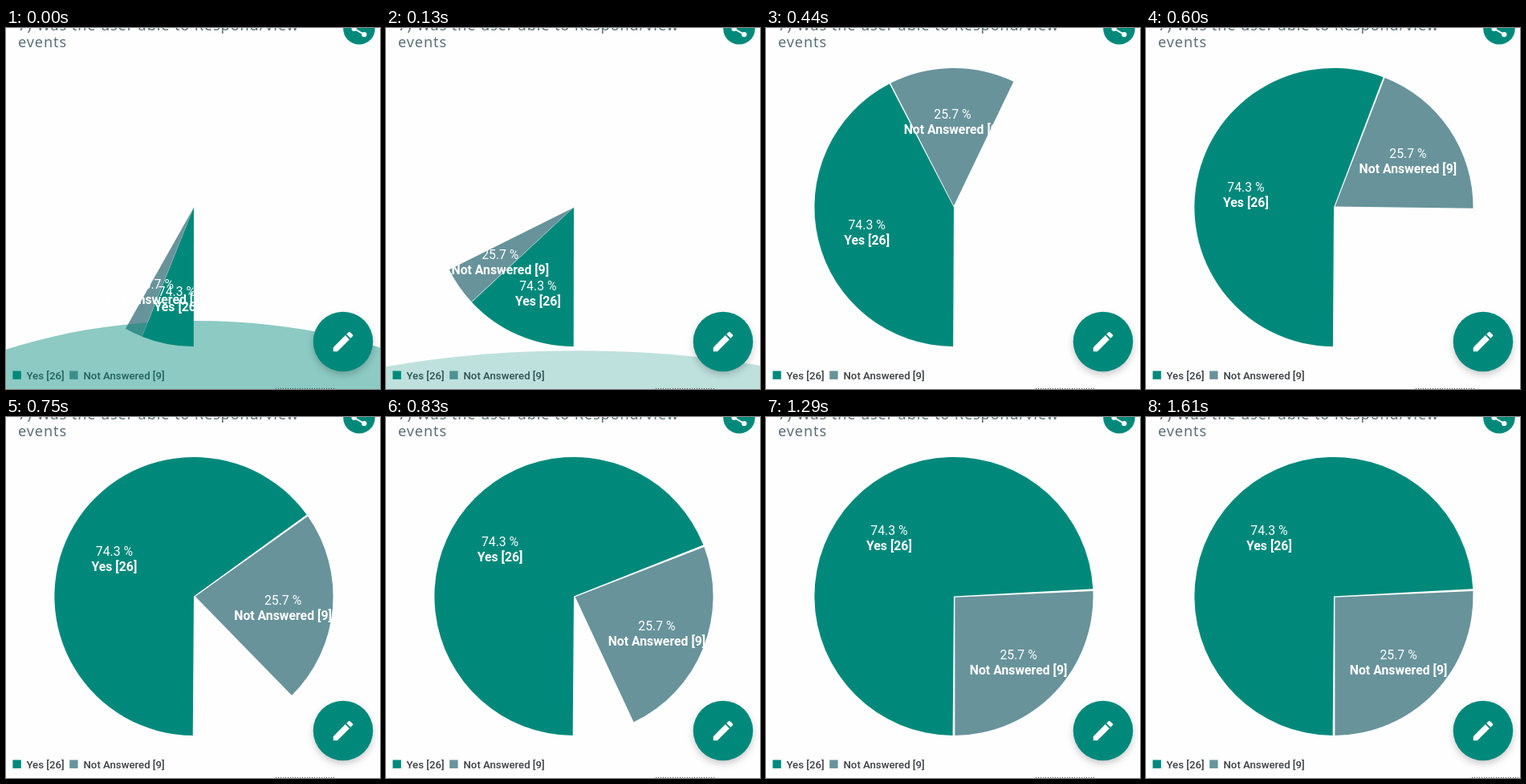
Write an HTML page that moves like this. It is 466 by 450 pixels and loops after 1.76 s.

```html
<!DOCTYPE html>
<html lang="en">
<head>
<meta charset="utf-8">
<title>Survey pie chart</title>
<style>
  html, body { margin: 0; width: 100%; height: 100%; overflow: hidden; background: #fefefe; }
  svg { display: block; width: 466px; height: 450px; }
  .title { font: 18.2px "Noto Sans", sans-serif; letter-spacing: .85px; fill: #5a7077; }
  .label { font: 15.8px Roboto, sans-serif; text-anchor: middle; fill: #fff; }
  .label .name { font-weight: bold; }
  .legend { font: 500 13.2px Roboto, sans-serif; fill: #3a3f42; }
  .green { fill: #00897b; }
  .slate { fill: #68939b; }
  .fab { filter: drop-shadow(0 4px 4px rgba(0, 0, 0, .2)); }
</style>
</head>
<body>
<svg viewBox="0 0 466 450">
  <text class="title" x="15" y="2.7">7) Was the user able to Respond/view</text>
  <text class="title" x="15" y="23.7">events</text>

  <path id="yesSlice" class="green"/>
  <path id="noneSlice" class="slate"/>
  <g id="yesLabel" class="label"><text>74.3 %</text><text class="name" y="19">Yes [26]</text></g>
  <g id="noneLabel" class="label"><text>25.7 %</text><text class="name" y="19">Not Answered [9]</text></g>

  <g class="legend">
    <rect class="green" x="8.4" y="427.5" width="10.4" height="10.4"/>
    <text x="25.5" y="437.7">Yes [26]</text>
    <rect class="slate" x="79.2" y="427.5" width="10.4" height="10.4"/>
    <text x="96.5" y="437.7">Not Answered [9]</text>
  </g>

  <ellipse id="glow" class="green" cx="237" rx="466"/>

  <g transform="translate(440 .8)">
    <circle class="green" r="19.8"/>
    <g fill="#fff" stroke="#fff" stroke-width="2">
      <path fill="none" d="M6.3 -7.3L-6.3 0L6.3 7.3"/>
      <circle cx="-6.3" r="2.2"/>
      <circle cx="6.3" cy="7.3" r="2.2"/>
    </g>
  </g>

  <circle class="green fab" cx="420" cy="391" r="37.3"/>
  <path fill="#fff" transform="translate(403.7 374.7) scale(1.36)"
    d="M3 17.25V21h3.75L17.81 9.94l-3.75-3.75zM20.71 7.04a1 1 0 0 0 0-1.41l-2.34-2.34a1 1 0 0 0-1.41 0l-1.83 1.83 3.75 3.75z"/>

  <path id="dots" stroke="#444" stroke-dasharray="1 2"/>
</svg>
<script>
const LOOP = 1760;
const CX = 234, CY = 223.5, RADIUS = 173.6, LABEL_RADIUS = 111.5;
const YES_ANGLE = 360 * 26 / 35;
const DEG = Math.PI / 180;
const GAP_ANGLE = 2.8 / RADIUS / DEG;

// The picture is held between these times.
const steps = [0, 70, 130, 210, 290, 360, 440, 520, 600, 680, 750, 830, 910, 980, 1060, 1130, 1610];
const progressKeys = [[0, .202], [130, .297], [440, .537], [750, .752], [980, .929], [1130, 1]];

const $ = id => document.getElementById(id);

function progressAt(t) {
  const next = progressKeys.findIndex(key => key[0] > t);
  if (next < 0) return 1;
  const [t0, p0] = progressKeys[next - 1], [t1, p1] = progressKeys[next];
  return p0 + (p1 - p0) * (t - t0) / (t1 - t0);
}

const easeInOut = p => p < .5 ? 2 * p * p : 1 - 2 * (1 - p) ** 2;

// Angles run clockwise in degrees from straight down.
function polar(angle, radius) {
  const a = angle * DEG;
  return [CX - radius * Math.sin(a), CY + radius * Math.cos(a)];
}

function drawSlice(name, from, to, phase) {
  const halfGap = GAP_ANGLE / 2;
  const start = (from + halfGap) * phase, end = (to - halfGap) * phase;
  const middle = (from + to) / 2 * phase;
  // Only slices up to a half circle have their tip moved out of the centre.
  const inset = to - from > 180 ? 0
    : RADIUS * Math.sin(halfGap * phase * DEG) / Math.sin((to - from) / 2 * phase * DEG);
  const large = end - start > 180 ? 1 : 0;
  $(name + "Slice").setAttribute("d", `M${polar(middle, inset)}L${polar(start, RADIUS)}` +
    `A${RADIUS} ${RADIUS} 0 ${large} 1 ${polar(end, RADIUS)}Z`);
  const [x, y] = polar(middle, LABEL_RADIUS);
  $(name + "Label").setAttribute("transform", `translate(${x} ${y + 1})`);
}

function drawGlow(t) {
  const strength = Math.max(0, 1 - t / 520) ** 2;
  const glow = $("glow");
  glow.setAttribute("ry", 258 * strength);
  glow.setAttribute("cy", 450 + 173 * strength);
  glow.setAttribute("opacity", .45 * strength);
}

function draw(t) {
  const phase = easeInOut(progressAt(t));
  drawSlice("yes", 0, YES_ANGLE, phase);
  drawSlice("none", YES_ANGLE, 360, phase);
  drawGlow(t);
  $("dots").setAttribute("d", t < 1610 ? "M336 449.5H410" : "M406 449.5H465");
}

const start = performance.now();
function tick() {
  const t = (performance.now() - start) % LOOP;
  draw(steps.filter(step => step <= t).pop());
  requestAnimationFrame(tick);
}
tick();
</script>
</body>
</html>
```
